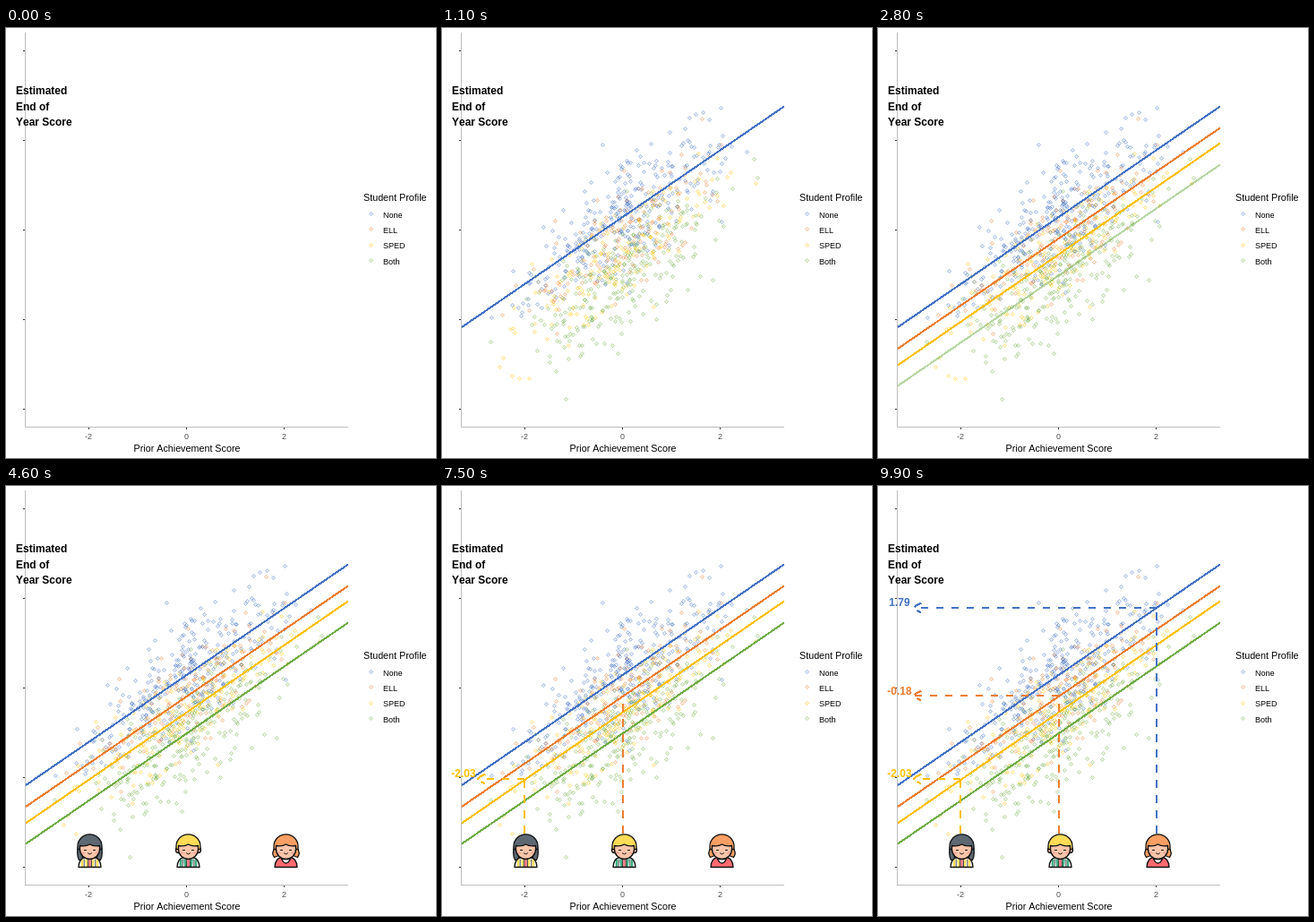
These frames come from a looping animation (480x480 px, 10 s). An HTML page:

```html
<!DOCTYPE html>
<html lang="en">
<head>
<meta charset="utf-8">
<title>Estimated end of year score</title>
<style>
  html, body { margin: 0; width: 100%; height: 100%; overflow: hidden; background: #fff; }
  svg { display: block; width: 100vw; height: 100vh; }
  text { font-family: "Liberation Sans", Arial, sans-serif; font-kerning: none; }
  .bold { font-size: 12px; font-weight: bold; }
  .title { font-size: 10.75px; }
  .small { font-size: 9px; }
  .tick { font-size: 9px; fill: #4d4d4d; text-anchor: middle; }
  .fit, .dash, .dot { shape-rendering: crispEdges; }
  .fit { stroke-width: 2.13; }
  .dash { fill: none; stroke-width: 2.13; stroke-dasharray: 8.5 8.5; }
  .ink { stroke: #111; stroke-width: 1.3; stroke-linejoin: round; stroke-linecap: round; }
  .dot { fill-opacity: .12; stroke-opacity: .42; stroke-width: 1.1; }
  .layer { opacity: 0; }
</style>
</head>
<body>
<svg id="stage" viewBox="0 0 480 480" xmlns="http://www.w3.org/2000/svg">
  <path d="M21.5 5V446M21 445.5H382" stroke="#bebebe" fill="none"/>
  <path d="M19 25.5h2M19 125.5h2M19 225.5h2M19 325.5h2M19 425.5h2M92.5 446v2M201.5 446v2M310.5 446v2" stroke="#333" fill="none"/>
  <text class="tick" x="92" y="458.5">-2</text>
  <text class="tick" x="201.5" y="458.5">0</text>
  <text class="tick" x="310.5" y="458.5">2</text>
  <text class="title" x="202" y="473" text-anchor="middle">Prior Achievement Score</text>
  <text class="bold" x="11" y="74">Estimated</text>
  <text class="bold" x="11" y="91.5">End of</text>
  <text class="bold" x="11" y="109">Year Score</text>
  <text class="title" x="399" y="193">Student Profile</text>
  <g id="legend"></g>
  <g id="plot"></g>
</svg>
<script>
  const LOOP = 10000;
  const plot = document.getElementById('plot');
  const legend = document.getElementById('legend');
  // y0 and y1 are the heights of each fitted line at the panel edges
  const groups = [
    { name: 'None', color: '#4472c4', y0: 334, y1: 87.5, share: .36,
      far: [[311, 89], [291, 94], [283, 96], [276, 100], [340, 138], [55, 323]] },
    { name: 'ELL', color: '#ed7d31', y0: 358, y1: 111.5, share: .17,
      far: [[290, 101], [126, 215], [67, 320], [302, 186]] },
    { name: 'SPED', color: '#ffc000', y0: 376.5, y1: 128.5, share: .18,
      far: [[350, 173], [64, 378], [68, 368], [78, 388], [86, 391], [97, 391], [318, 166]] },
    { name: 'Both', color: '#70ad47', y0: 399.5, y1: 152.5, share: .29,
      far: [[138, 414], [352, 167], [348, 146], [54, 350], [127, 383], [302, 281], [274, 292]] }
  ];

  let seed = 20417;
  function rand() {
    seed = (seed + 0x6d2b79f5) | 0;
    let t = Math.imul(seed ^ (seed >>> 15), 1 | seed);
    t = (t + Math.imul(t ^ (t >>> 7), 61 | t)) ^ t;
    return ((t ^ (t >>> 14)) >>> 0) / 4294967296;
  }
  const gauss = () => Math.sqrt(-2 * Math.log(1 - rand())) * Math.cos(2 * Math.PI * rand());

  // Dots sit on whole pixels
  const snap = v => Math.floor(v) + .5;
  const dot = (x, y, color) =>
    `<circle class="dot" cx="${snap(x)}" cy="${snap(y)}" r="1.6" fill="${color}" stroke="${color}"/>`;

  function pickGroup() {
    let r = rand();
    return groups.find(g => (r -= g.share) < 0) || groups[3];
  }

  function cloud(count) {
    let out = '';
    while (count > 0) {
      const g = pickGroup();
      const x = 202 + 55 * gauss();
      const y = g.y0 + (g.y1 - g.y0) * (x - 22) / 360 + 29 * gauss();
      if (x < 75 || x > 325 || y < 102 || y > 380) continue;
      out += dot(x, y, g.color);
      count--;
    }
    for (const g of groups) for (const [x, y] of g.far) out += dot(x, y, g.color);
    return out;
  }

  const fitLine = g =>
    `<line class="fit" x1="22" y1="${g.y0}" x2="382" y2="${g.y1}" stroke="${g.color}"/>`;
  const riser = (x, y, color) => `<path class="dash" d="M${x} 387.5V${y}" stroke="${color}"/>`;
  const arrow = (x, y, color) =>
    `<path class="dash" d="M${x} ${y}H38.5" stroke="${color}"/>` +
    `<path class="dash" d="M48 ${y - 5.4}L38.5 ${y}L48 ${y + 5.4}" stroke="${color}"/>`;
  const label = (text, y, color) =>
    `<text class="bold" x="24" y="${y}" text-anchor="middle" fill="${color}">${text}</text>`;

  const braids = '<path class="ink" d="M-13 14Q-15 23-12 29H-8V16ZM13 14Q15 23 12 29H8V16Z"/>';
  const buns = '<path class="ink" d="M-12 15Q-17 21-13 26L-8 24ZM12 15Q17 21 13 26L8 24Z"/>';
  const ears = '<path class="ink" d="M-11 15a3 3 0 0 0 0 6M11 15a3 3 0 0 1 0 6" fill="#fcc5aa"/>';
  const stripes = color =>
    `<path d="M-8.5 28V37M8.5 28V37M-4 28L-3 37M4 28L3 37" stroke="${color}" stroke-width="2.6"/>` +
    '<path d="M-6.3 28V37M6.3 28V37M-2 28V37M2 28V37" stroke="#222" stroke-width=".8"/>' +
    '<path d="M0 28V37" stroke="#ef7078" stroke-width="2.6"/>';
  const collar = '<path class="ink" d="M-5 28Q0 37 5 28Z" fill="#fff"/>';

  function student(cx, hair, cloth, trim, sides) {
    const body = 'M-12.5 37Q-12 27-5 26H5Q12 27 12.5 37Z';
    return `<g transform="translate(${cx} 388.5)">
      <g fill="${hair}">${sides}</g>
      <path d="${body}" fill="${cloth}"/>
      ${trim}
      <path class="ink" d="${body}" fill="none"/>
      <path class="ink" d="M-13.5 17V13.5A13.5 13.2 0 0 1 13.5 13.5V17Z" fill="${hair}"/>
      <path class="ink" d="M-11 13Q-4 14 0 11.5Q4 14 11 13V17A11 11 0 0 1-11 17Z" fill="#fcc5aa"/>
      <path class="ink" d="M-6 18h2M4 18h2M-2 21.5Q0 23.5 2 21.5" fill="none" style="stroke-width:1"/>
      <path d="M-8.5 21H-6M6 21h2.5" stroke="#f79a96" stroke-width="1.6"/>
    </g>`;
  }

  const style = document.createElement('style');
  document.head.append(style);
  let count = 0;

  // Adds a layer that enters at a time, optionally half faded for its first 100 ms
  function layer(time, content, first = 1) {
    const id = 'enter' + count++;
    const at = time / LOOP * 100;
    style.textContent += `@keyframes ${id}{0%{opacity:0}${at}%{opacity:${first}}` +
      `${at + 1}%{opacity:1}100%{opacity:1}}`;
    plot.insertAdjacentHTML('beforeend',
      `<g class="layer" style="animation:${id} ${LOOP}ms step-end infinite">${content}</g>`);
  }

  groups.forEach((g, i) => {
    const y = 207.5 + i * 17.3;
    legend.innerHTML += dot(407, y, g.color) +
      `<text class="small" x="421" y="${Math.round(y + 4.3)}">${g.name}</text>`;
  });

  layer(400, cloud(870), .5);
  groups.forEach((g, i) => layer(1000 + i * 600, fitLine(g), .5));

  layer(3400, student(93.5, '#5d6872', '#fff', stripes('#ffe066'), braids));
  layer(4000, student(203.5, '#ffdc58', '#fff', stripes('#3fae84'), ears));
  layer(4600, student(312.5, '#fb9f63', '#ff6b70', collar, buns));

  const reads = [
    { x: 92, y: 327, text: '-2.03', base: 325, color: groups[2].color, at: [5200, 5800, 6400] },
    { x: 202, y: 234, text: '-0.18', base: 233, color: groups[1].color, at: [7000, 7600, 8200] },
    { x: 311, y: 136, text: '1.79', base: 134, color: groups[0].color, at: [8800, 9400, 9900] }
  ];
  for (const r of reads) {
    layer(r.at[0], riser(r.x, r.y, r.color));
    layer(r.at[1], arrow(r.x, r.y, r.color));
    layer(r.at[2], label(r.text, r.base, r.color));
  }
</script>
</body>
</html>
```
